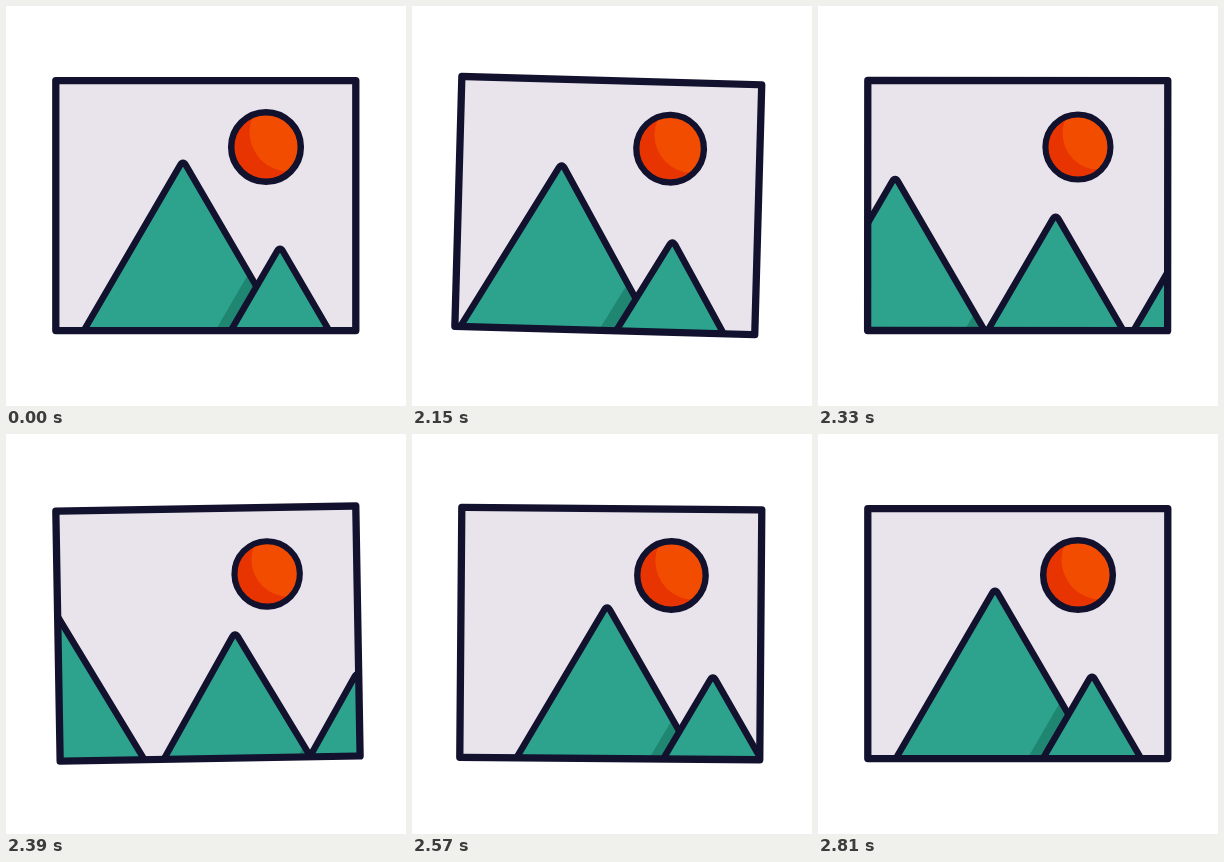
Animation of 400 by 400 pixels, one loop 2840 ms. Source, as an HTML page with a canvas:

```html
<!DOCTYPE html>
<html lang="en">
<head>
<meta charset="utf-8">
<title>Swinging picture</title>
<style>
  html, body { margin: 0; width: 100%; height: 100%; overflow: hidden; background: #fff; }
  canvas { display: block; width: 400px; height: 400px; }
</style>
</head>
<body>
<canvas id="stage" width="400" height="400"></canvas>
<script>
const ctx = document.getElementById('stage').getContext('2d');
const LOOP = 2840, START = 2000, STEP = 30;
const INK = '#12122f', SKY = '#e9e4ec', GREEN = '#2da38e', SHADE = '#1f8771';
const RED = '#e83400', ORANGE = '#f24c00';

// [time after START, value]
const SWING = [[0, 0], [210, 2], [415, -1.12], [580, 0.48], [810, 0]];
const SUN_SCALE = [[0, 1], [330, 0.935], [690, 1]];
const TRAVEL = [[0, 0], [795, 1]];

// Stops a mountain passes through, right to left
const STOPS = [[419, 240.2], [274, 240.2], [177, 154.2], [-90, 198]];

const ease = u => u * u * (3 - 2 * u);
const mix = (a, b, u) => a + (b - a) * u;

function valueAt(keys, t) {
  if (t <= keys[0][0]) return keys[0][1];
  for (let i = 1; i < keys.length; i++) {
    const [t0, a] = keys[i - 1], [t1, b] = keys[i];
    if (t < t1) return mix(a, b, ease((t - t0) / (t1 - t0)));
  }
  return keys[keys.length - 1][1];
}

function circle(x, y, r) {
  const path = new Path2D();
  path.arc(x, y, r, 0, 7);
  return path;
}

function peak(x, y) {
  return new Path2D(`M${x - 131} ${y + 225}L${x - 3} ${y + 5.15}Q${x} ${y} ${x + 3} ${y + 5.15}L${x + 131} ${y + 225}Z`);
}

function fill(path, color) {
  ctx.fillStyle = color;
  ctx.fill(path);
}

function outline(path, width) {
  ctx.lineWidth = width;
  ctx.stroke(path);
}

// Fills a shape, then a second one kept inside it, then the outline
function shaded(path, color, inner, innerColor) {
  fill(path, color);
  if (inner) {
    ctx.save();
    ctx.clip(path);
    fill(inner, innerColor);
    ctx.restore();
  }
  outline(path, 6.5);
}

function drawSun(scale) {
  ctx.save();
  ctx.translate(260, 141);
  ctx.scale(scale, scale);
  shaded(circle(0, 0, 34.8), RED, circle(23, -15, 39.5), ORANGE);
  ctx.restore();
}

function drawMountains(e) {
  const spots = [2, 1, 0].map(i =>
    [0, 1].map(axis => mix(STOPS[i][axis], STOPS[i + 1][axis], e)));
  const shadeWidths = [15.5 + 21 * e, 9 + 6.5 * e];
  spots.forEach(([x, y], i) => {
    const next = spots[i + 1];
    shaded(peak(x, y), GREEN, next && peak(next[0] - shadeWidths[i], next[1]), SHADE);
  });
}

function draw(t) {
  ctx.clearRect(0, 0, 400, 400);
  ctx.save();
  ctx.strokeStyle = INK;
  ctx.lineJoin = 'round';

  // The picture hangs from the middle of its top edge
  ctx.translate(200, 74.5);
  ctx.rotate(valueAt(SWING, t) * Math.PI / 180);
  ctx.translate(-200, -74.5);

  const frame = new Path2D();
  frame.rect(49.8, 74.6, 300, 250);
  fill(frame, SKY);
  ctx.save();
  ctx.clip(frame);
  drawSun(valueAt(SUN_SCALE, t));
  drawMountains(valueAt(TRAVEL, t));
  ctx.restore();
  outline(frame, 7.3);
  ctx.restore();
}

function tick() {
  const t = performance.now() % LOOP - START;
  draw(Math.max(0, Math.floor(t / STEP) * STEP));
  requestAnimationFrame(tick);
}
tick();
</script>
</body>
</html>
```
